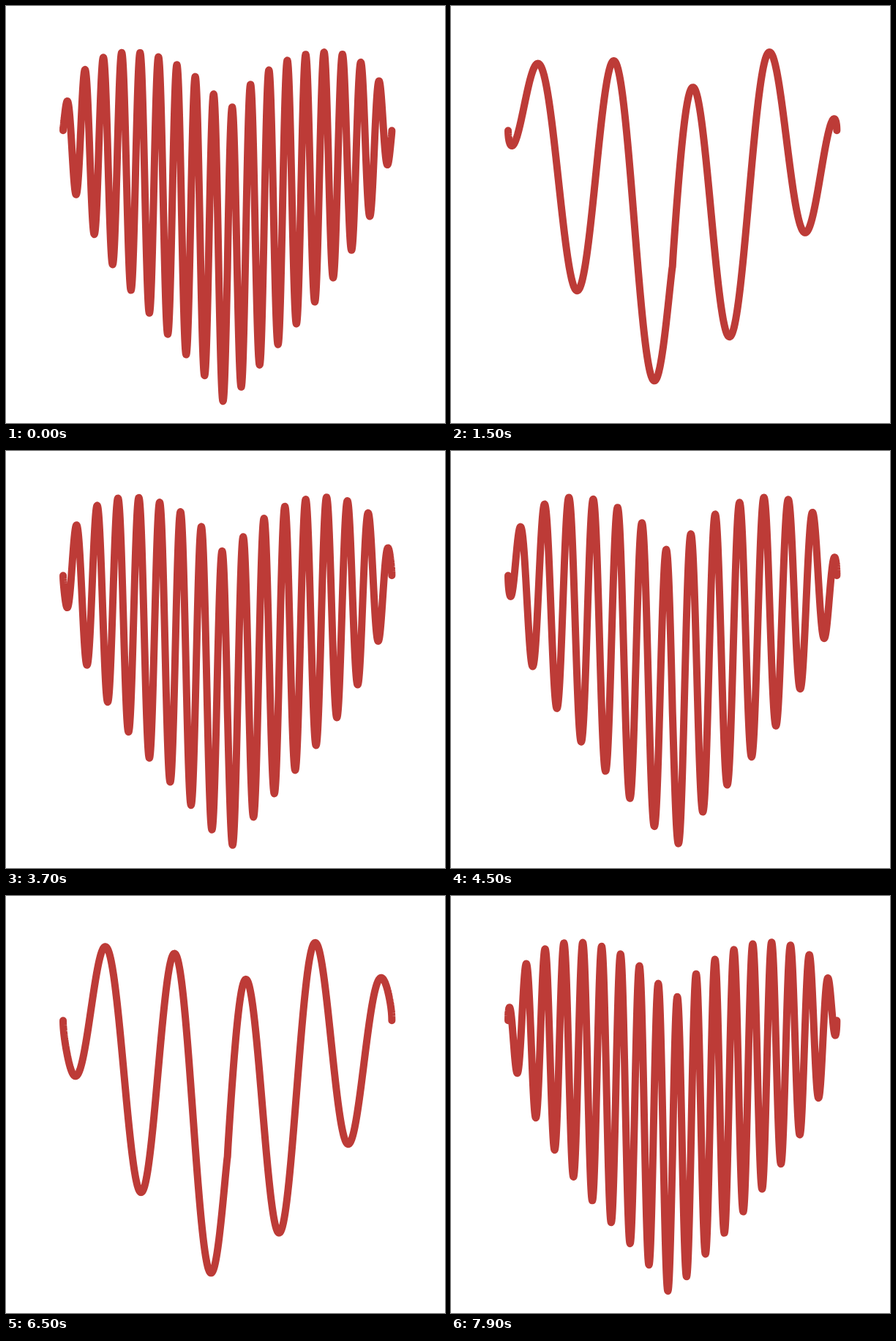
An HTML page that plays this animation: 600 by 570 pixels, repeating every 8000 ms.

```html
<!DOCTYPE html>
<html lang="en">
<head>
<meta charset="utf-8">
<title>Heart curve</title>
<style>
  html, body { margin: 0; width: 100%; height: 100%; overflow: hidden; background: #fff; }
  svg { display: block; width: 600px; height: 570px; }
  path { fill: none; stroke: #bd3b37; stroke-width: 10; stroke-linecap: round; stroke-linejoin: round; }
</style>
</head>
<body>
<svg viewBox="0 0 600 570"><path id="curve"/></svg>
<script>
  const LOOP = 8000, STEP = 100, POINTS = 1600;
  const EDGE = Math.sqrt(3);
  const CX = 302.7, CY = 356.3, SX = 129.7, SY = 129;
  const curve = document.getElementById('curve');

  // The wave number falls and rises again at a constant rate.
  const waveNumber = n => Math.max(32.41 - 1.6485 * n, -32.695 + 1.648 * (n - 40));

  // y = |x|^(2/3) + 0.9 sin(kx) sqrt(3 - x^2)
  const height = (x, k) =>
    Math.cbrt(x * x) + 0.9 * Math.sin(k * x) * Math.sqrt(Math.max(0, 3 - x * x));

  function heart(k) {
    let d = '';
    for (let i = 0; i <= POINTS; i++) {
      const x = EDGE * Math.sin(Math.PI * (i / POINTS - 0.5));
      const px = CX + SX * x, py = CY - SY * height(x, k);
      d += (i ? 'L' : 'M') + px.toFixed(2) + ' ' + py.toFixed(2);
    }
    return d;
  }

  let shown = -1;
  function draw(now) {
    const n = Math.floor((now % LOOP) / STEP);
    if (n !== shown) {
      curve.setAttribute('d', heart(waveNumber(n)));
      shown = n;
    }
  }

  const start = performance.now();
  function tick() {
    draw(performance.now() - start);
    requestAnimationFrame(tick);
  }
  tick();
</script>
</body>
</html>
```
